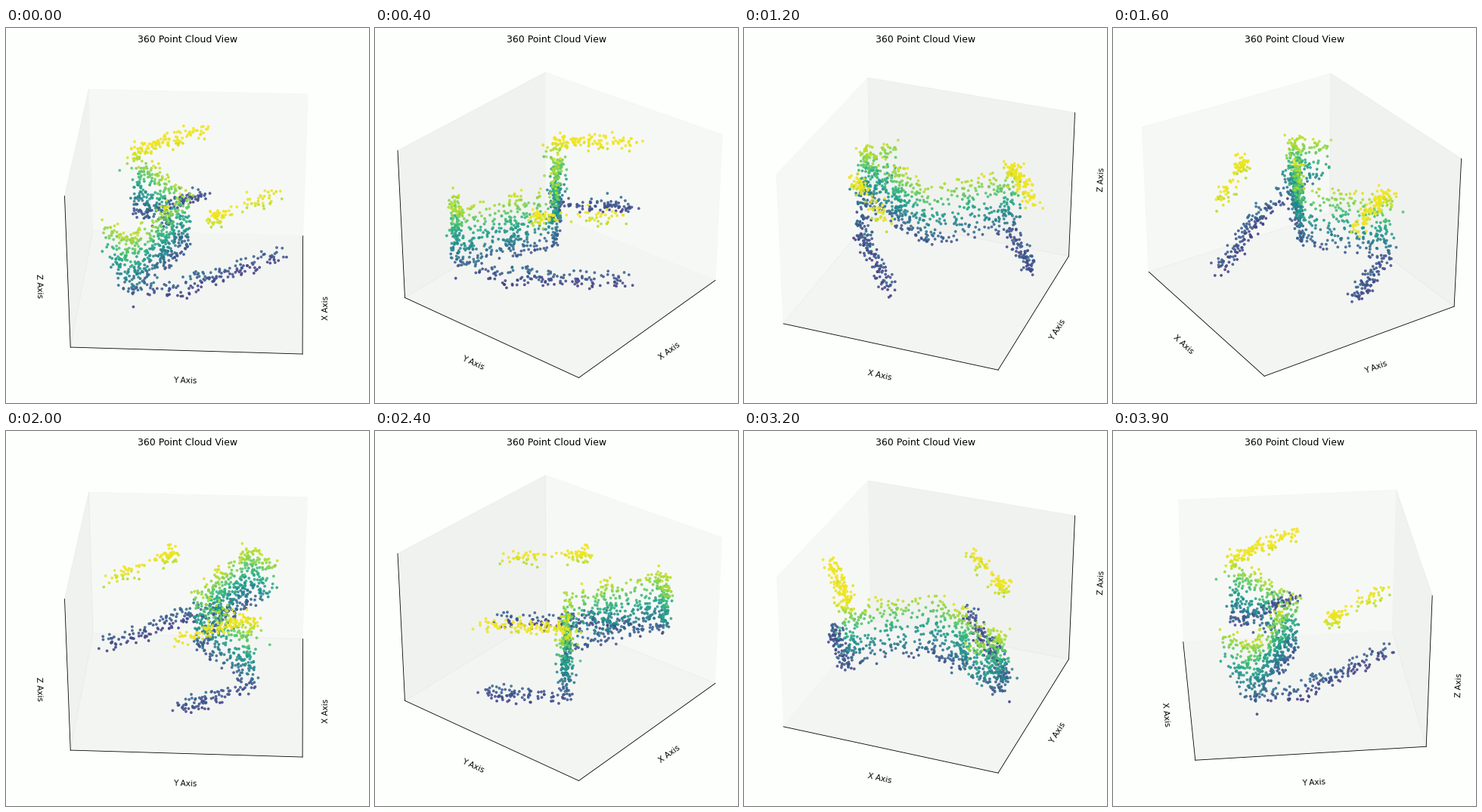
Recreate the animation shown at these times as a matplotlib script. Size 480 by 497 pixels, loop 4000 ms.

```python
import numpy as np
import matplotlib.pyplot as plt
from matplotlib.animation import FuncAnimation

W, H, DPI = 480, 497, 75
FRAMES, INTERVAL = 40, 100
ELEV, AZIM_START, AZIM_STEP = 30, 3, 360 / FRAMES
BACKGROUND = "#fcfffc"
SIDE = 463.6            # axes size in pixels
HALF, TALL = 149.2, 111.9  # half extents of the box

# floor plan of the cloud
TIP_A, FAR, CENTER = (-146, 10), (-86, -78), (6, -6)
CORNER, END, BEND, TIP_B = (128, -74), (90, -106), (100, 0), (11, 116)
RIDGE_B = (92, 30)

rng = np.random.default_rng(7)


def along(path, n, spread=4, bias=1.0):
    """Scatter n points along a polyline; bias > 1 crowds them near its start."""
    path = np.array(path, float)
    steps = np.hypot(*np.diff(path, axis=0).T)
    marks = np.append(0, np.cumsum(steps)) / steps.sum()
    u = rng.random(n) ** bias
    xy = np.column_stack([np.interp(u, marks, axis) for axis in path.T])
    return xy + rng.normal(0, spread, (n, 2)), u


def body(n):
    """Bent wall with a sagging top edge and a raised far end."""
    xy, u = along([FAR, CENTER, CORNER, END], n)
    z = rng.uniform(-47 + 28 * u**8, 42 + 46 * (u - 0.55) ** 2)
    return np.column_stack([xy, z])


def post(spot, n, spread):
    xy, _ = along([spot, CENTER], n, spread, bias=8)
    return np.column_stack([xy, rng.uniform(-46, 50, n)])


def row(path, n, height, bias):
    xy, _ = along(path, n, 5.5, bias)
    return np.column_stack([xy, rng.normal(height, 5, n)])


def foot(n):
    """Low wall that drops to a strip on its way to the tip."""
    xy, u = along([CORNER, BEND, TIP_B], n, 6, bias=0.8)
    z = rng.uniform(-57, -37 + 38 * np.exp(-4 * u))
    return np.column_stack([xy, z])


def make_cloud():
    middle = np.add(CORNER, CENTER) / 2 - (8, -6)
    return np.vstack([
        body(520),
        post(FAR, 85, 7),
        post(middle, 60, 4),
        post(CORNER, 60, 7),
        row([FAR, TIP_A], 105, 54, 1.4),
        row([FAR, TIP_A], 85, -45, 1.2),
        foot(150),
        row([RIDGE_B, TIP_B], 85, 51, 1.9),
    ])


fig = plt.figure(figsize=(6.4, 6.6267), dpi=DPI, facecolor=BACKGROUND)
ax = fig.add_axes([(1 - SIDE / W) / 2, 7.9 / H, SIDE / W, SIDE / H], projection="3d")
ax.set_facecolor(BACKGROUND)
ax.set_title("360 Point Cloud View")

x, y, z = make_cloud().T
ax.scatter(x, y, z, c=np.minimum(z, 53), cmap="viridis", s=7, alpha=0.8,
           vmin=-78, vmax=56)

ax.set(xlim=(-HALF, HALF), ylim=(-HALF, HALF), zlim=(-TALL, TALL),
       xticks=[], yticks=[], zticks=[],
       xlabel="X Axis", ylabel="Y Axis", zlabel="Z Axis")


def update(i):
    ax.view_init(elev=ELEV, azim=AZIM_START + AZIM_STEP * i)
    return ()


anim = FuncAnimation(fig, update, frames=FRAMES, interval=INTERVAL, repeat=True)
plt.show()
```
